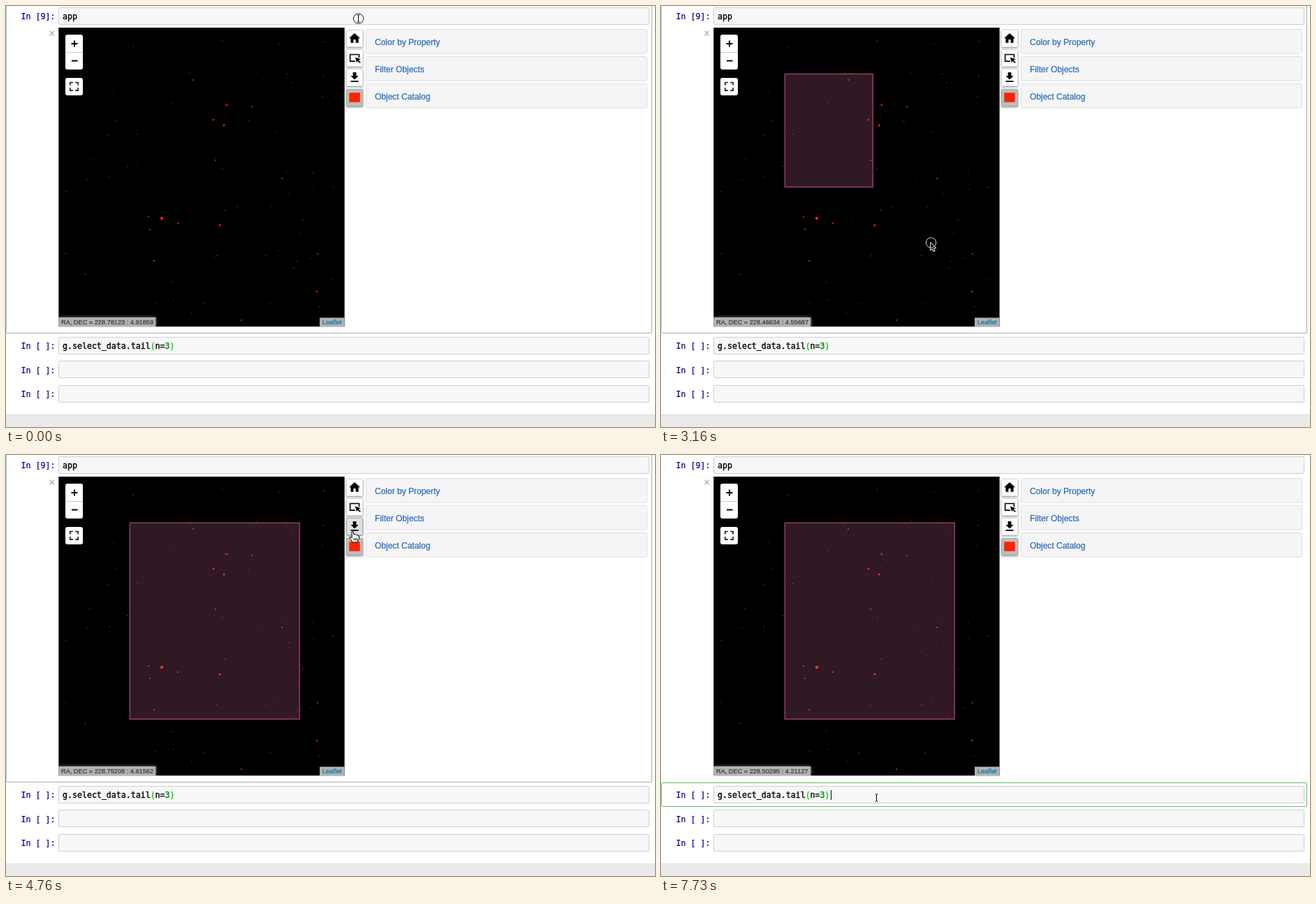
An HTML page with a canvas for the animation above (8 s loop, 929 px wide and 603 px high).

```html
<!DOCTYPE html>
<html lang="en">
<head>
<meta charset="utf-8">
<title>Notebook sky map</title>
<style>
  html, body { margin: 0; width: 100%; height: 100%; overflow: hidden; background: #fff; }
  canvas { display: block; }
</style>
</head>
<body>
<canvas id="stage" width="929" height="603"></canvas>
<script>
const ctx = document.getElementById('stage').getContext('2d');
const LOOP = 8000;
const STEP = 117; // pointer sampling interval, also the lag of the page behind it
const SANS = '"Liberation Sans", Arial, sans-serif';
const MONO = '"DejaVu Sans Mono", monospace';
const MAP = { x: 75.3, y: 31, w: 409.3, h: 428.2 };

// Bright stars, largest first; the faint ones are scattered at random.
const BRIGHT = [[223, 304], [306, 314], [312, 171], [297, 163], [316, 142], [445, 409], [212, 365], [246, 311],
  [206, 320], [337, 450], [268, 106], [300, 221], [395, 247], [352, 144], [446, 355], [204, 302]];
const FAINT_COUNT = 64;

// Legs of the pointer's way, each with its end point and the sky position read out there.
const START = { x: 504, y: 18, sky: [228.78123, 4.91859] };
const LEGS = [
  { from: 830, to: 1420, x: 498, y: 75 },
  { from: 1900, to: 2450, x: 200, y: 113, sky: [228.28473, 4.70478] },
  { from: 2570, to: 2690, x: 177, y: 97, sky: [228.2685, 4.83662] },
  { from: 2930, to: 3040, x: 303, y: 259 },
  { from: 3160, to: 3160, x: 385, y: 338, sky: [228.46634, 4.55687] },
  { from: 3280, to: 3390, x: 420, y: 378, sky: [228.6501, 4.3513] },
  { from: 3870, to: 4110, x: 432, y: 355, sky: [228.67138, 4.34599] },
  { from: 4220, to: 4340, x: 536, y: 88, sky: [228.75208, 4.61562] },
  { from: 4490, to: 4760, x: 497, y: 110 },
  { from: 5470, to: 5940, x: 340, y: 433, sky: [228.54543, 4.27424] },
  { from: 6090, to: 6210, x: 308, y: 491, sky: [228.50295, 4.21127] }
];
const DRAG = { from: 2810, to: 3510, x: 177, y: 97 };
const EDIT_AT = 6690;

const TOOLS = ['home', 'select', 'download', 'color'].map((name, i) => ({ name, x: 487, y: 34 + 28.2 * i, w: 24, h: 25 }));
const PANELS = ['Color by Property', 'Filter Objects', 'Object Catalog']
  .map((label, i) => ({ label, y: 33.3 + 39.3 * i }));
const FILTER_LINK = { name: 'filter', x: 528, y: 84, w: 70, h: 14 };

const ICONS = {
  home: new Path2D('M10 20v-6h4v6h5v-8h3L12 3 2 12h3v8z'),
  download: new Path2D('M19 9h-4V3H9v6H5l7 7 7-7zM5 18v2h14v-2z'),
  select: new Path2D('M3 5h18v7h-2V7H5v10h8v2H3zM13 11l10 3.5-3.8 1.7 3.8 4-1.6 1.5-4-4L16 21z')
};

const between = (t, a, b) => t >= a && t < b;
const inside = (p, r) => between(p.x, r.x, r.x + r.w) && between(p.y, r.y, r.y + r.h);
const mix = (a, b, p) => a + (b - a) * p;

function random(seed) {
  return () => (seed = (seed * 16807) % 2147483647) / 2147483647;
}

function pointerAt(t) {
  let state = START;
  for (const leg of LEGS) {
    if (t < leg.from) break;
    const steps = Math.round((leg.to - leg.from) / STEP);
    const done = t >= leg.to ? 1 : (Math.floor((t - leg.from) / (leg.to - leg.from) * steps + .1) + 1) / (steps + 1);
    const p = Math.sin(done * Math.PI / 2);
    const target = leg.sky || state.sky;
    state = {
      x: mix(state.x, leg.x, p),
      y: mix(state.y, leg.y, p),
      sky: state.sky.map((v, i) => mix(v, target[i], p))
    };
  }
  return state;
}

const targetAt = p => [...TOOLS, FILTER_LINK].find(r => inside(p, r))?.name;

function fillRect(x, y, w, h, color) {
  ctx.fillStyle = color;
  ctx.fillRect(x, y, w, h);
}

function box(x, y, w, h, radius, fill, stroke) {
  ctx.beginPath();
  ctx.roundRect(x, y, w, h, radius);
  if (fill) { ctx.fillStyle = fill; ctx.fill(); }
  if (stroke) { ctx.strokeStyle = stroke; ctx.lineWidth = 1; ctx.stroke(); }
}

function text(str, x, y, font, color, weight = .2) {
  ctx.font = font;
  ctx.fillStyle = ctx.strokeStyle = color;
  ctx.lineWidth = weight;
  ctx.fillText(str, x, y);
  ctx.strokeText(str, x, y);
  return x + ctx.measureText(str).width;
}

function line(points, color, width) {
  ctx.beginPath();
  points.forEach(([x, y]) => ctx.lineTo(x, y));
  ctx.strokeStyle = color;
  ctx.lineWidth = width;
  ctx.stroke();
}

function dot(x, y, r, color) {
  ctx.beginPath();
  ctx.arc(x, y, r, 0, 2 * Math.PI);
  ctx.fillStyle = color;
  ctx.fill();
}

function shadowed(blur, dy, color, paint) {
  ctx.save();
  ctx.shadowColor = color;
  ctx.shadowBlur = blur;
  ctx.shadowOffsetY = dy;
  paint();
  ctx.restore();
}

function drawCells(editing, caret) {
  const code = `11.6px ${MONO}`;
  fillRect(0, 0, 929, 603, '#fff');
  fillRect(0, 585, 929, 1, '#dcdcdc');
  fillRect(0, 586, 929, 17, '#eaeaea');

  if (editing) {
    box(.5, 469.5, 924, 34, 1, null, '#66bb6a');
  } else {
    box(.5, -9.5, 924, 478, 1, null, '#ababab');
    fillRect(0, 0, 1, 468, '#a5cef2');
  }

  [2, 474, 508.5, 543].forEach((y, i) => {
    box(75.5, Math.floor(y) + .5, 845, 24, 1.5, '#f7f7f7', '#cfcfcf');
    text(`In [${i ? ' ' : 9}]:`, 21.5, y + 17, code, '#000080');
  });

  text('app', 81, 19, code, '#000', .35);
  let x = 81;
  for (const part of ['g.select_data.tail', '(', 'n=', '3', ')']) {
    const color = /[()]/.test(part) ? '#0c0' : part === '3' ? '#080' : '#000';
    x = text(part, x, 491, code, color, .35);
  }
  if (caret) fillRect(243, 480, 1, 14, '#000');
  text('×', 61.5, 43.5, `bold 14px ${SANS}`, '#bbb');
}

function drawStars() {
  const rnd = random(228);
  for (let i = 0; i < FAINT_COUNT; i++) {
    dot(MAP.x + rnd() * MAP.w, 45 + rnd() * 400, .5 + .35 * rnd(), 'rgba(255,34,8,.75)');
  }
  BRIGHT.forEach(([x, y], i) => dot(x, y, .9 + 1.3 / (1 + .8 * i), '#ff2208'));
}

function drawSelection(t) {
  if (t < DRAG.from + STEP) return;
  const corner = pointerAt(Math.min(t, DRAG.to) - STEP);
  const rect = [DRAG.x + .3, DRAG.y + .3, corner.x - DRAG.x, corner.y - DRAG.y];
  ctx.fillStyle = 'rgba(240,120,178,.2)';
  ctx.fillRect(...rect);
  ctx.strokeStyle = 'rgba(205,92,150,.62)';
  ctx.lineWidth = 1.6;
  ctx.strokeRect(...rect);
}

function drawMapControls([ra, dec]) {
  const small = `9.2px ${SANS}`;
  box(85, 41, 25, 50, 3, '#fff');
  fillRect(85, 66, 25, 1, '#ccc');
  fillRect(93.5, 53, 9, 2, '#000');
  fillRect(97, 49.5, 2, 9, '#000');
  fillRect(94, 77.5, 8.5, 2, '#000');
  box(85, 103, 25, 25, 3, '#fff');
  for (const sx of [-1, 1]) for (const sy of [-1, 1]) {
    const x = 97.5 + 5.7 * sx, y = 115.3 + 5.7 * sy;
    line([[x - 4 * sx, y], [x, y], [x, y - 4 * sy]], '#333', 1.9);
  }

  shadowed(5, 0, 'rgba(255,255,255,.5)', () => fillRect(75.3, 446, 139, 13.2, '#b2b2b2'));
  text(`RA, DEC = ${ra.toFixed(5)} : ${dec.toFixed(5)}`, 79, 456, small, '#333');
  fillRect(449, 446.5, 35.5, 12.7, '#b2b2b2');
  text('Leaflet', 453, 456, small, '#0078a8');
}

function drawTools(hover, armed) {
  for (const { name, x, y, w, h } of TOOLS) {
    const fill = name === 'color' ? '#bdbdbd' : name === 'select' && armed ? '#c8c8c8'
      : name === hover ? '#e0e0e0' : '#fff';
    const top = Math.round(y);
    shadowed(3, 1, 'rgba(0,0,0,.45)', () => box(x, top, w, h, 1, fill));
    box(x + .5, top + .5, w - 1, h - 1, 1, null, fill === '#fff' ? '#ddd' : '#aaa');
    if (name === 'color') {
      box(x + 4.5, top + 5.5, 15, 13, 0, '#ff2200', '#d8553c');
      continue;
    }
    ctx.save();
    ctx.translate(x + 12, top + 12.3);
    ctx.scale(.8, .8);
    ctx.translate(-12, -12);
    ctx.fillStyle = '#000';
    ctx.fill(ICONS[name]);
    ctx.restore();
  }
}

function drawPanels(hoverFilter) {
  for (const { label, y } of PANELS) {
    const hover = hoverFilter && label === 'Filter Objects';
    box(515.5, Math.floor(y) + .5, 402, 34.5, 2, '#f5f5f5', '#ddd');
    const baseline = Math.round(y + 22.5);
    const end = text(label, 528, baseline, `12px ${SANS}`, hover ? '#23527c' : '#2467b6');
    if (hover) fillRect(528, baseline + 1, end - 528, 1, '#23527c');
  }
}

const ARROW = new Path2D('M.7 .5v11.6l2.6-2.3 1.9 4.1 2-.9-1.8-4 3.6-.2z');
const HAND = new Path2D('M-2 0h2l1 4 2-.6 1 1.1 2-.3 1 1.6 1.4.2v4l-1.9 3v2h-8l-.5-2-3-4v-1.7h1.6L-1.8 9z');
const FINGERS = new Path2D('M1.2 9v3.5M3.4 9v3.5M5.4 9v3.5');
const BEAM = new Path2D('M-1.5-5.5L.5-4.5 2.5-5.5M.5-4.5V4.5M-1.5 5.5L.5 4.5 2.5 5.5');

function drawPointer({ x, y }, overTarget, pressed) {
  const beam = y < 26 || y > 470;
  ctx.save();
  ctx.translate(x, y);
  ctx.lineWidth = 1;
  ctx.strokeStyle = '#000';
  if (beam) {
    ctx.stroke(BEAM);
  } else if (overTarget) {
    ctx.fillStyle = '#fff';
    ctx.fill(HAND);
    ctx.stroke(HAND);
    ctx.stroke(FINGERS);
  } else {
    ctx.fillStyle = '#000';
    ctx.strokeStyle = '#fff';
    ctx.fill(ARROW);
    ctx.stroke(ARROW);
  }
  if (pressed) {
    ctx.beginPath();
    ctx.arc(beam ? .5 : 1.5, beam ? 0 : 1, 7.2, 0, 2 * Math.PI);
    ctx.strokeStyle = beam ? '#222' : '#ddd';
    ctx.stroke();
  }
  ctx.restore();
}

function draw(t) {
  const pointer = pointerAt(t);
  const hover = targetAt(pointerAt(t - STEP));
  const pressed = t < 140 || between(t, DRAG.from, DRAG.to) || between(t, EDIT_AT, EDIT_AT + 150);

  drawCells(t >= EDIT_AT, between(t, EDIT_AT, 7260) || t >= 7730);
  fillRect(MAP.x, MAP.y, MAP.w, MAP.h, '#000');
  drawStars();
  drawSelection(t);
  drawMapControls(pointer.sky);
  drawTools(hover, between(t, 1900, DRAG.from));
  drawPanels(hover === 'filter');
  drawPointer(pointer, targetAt(pointer), pressed);
}

function tick() {
  draw(performance.now() % LOOP);
  requestAnimationFrame(tick);
}
tick();
</script>
</body>
</html>
```
